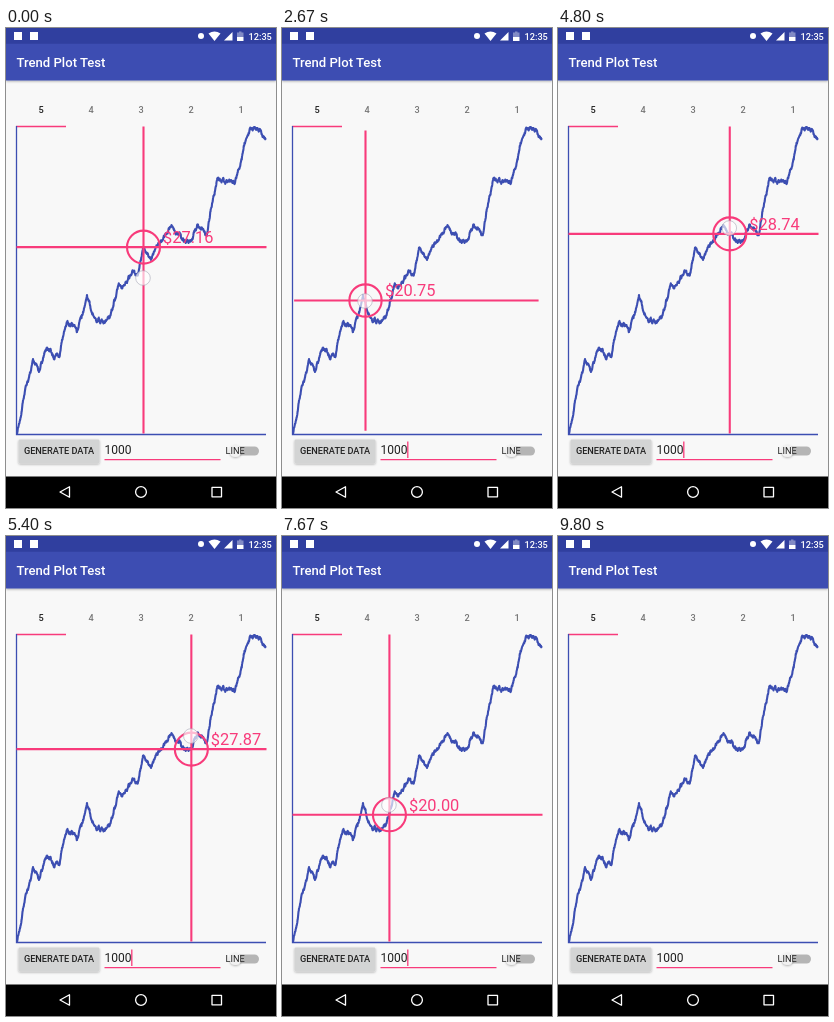
An HTML page for the animation above (9.99 s loop, 270x480 px).

```html
<!DOCTYPE html>
<html lang="en">
<head>
<meta charset="utf-8">
<title>Trend Plot Test</title>
<style>
  html, body { margin: 0; width: 100%; height: 100%; overflow: hidden; background: #f8f8f8; }
  svg { display: block; width: 100%; height: 100%; font-family: Roboto, sans-serif; }
  .bold { font-weight: 500; }
  .mid { text-anchor: middle; }
  .accent { stroke: #f83b7b; fill: none; }
  .blue { stroke: #3c4eb2; fill: none; }
</style>
</head>
<body>
<svg viewBox="0 0 270 480" font-size="9.2">
  <defs>
    <filter id="shade" x="-20%" y="-30%" width="140%" height="180%">
      <feDropShadow dx="0" dy="0.9" stdDeviation="0.9" flood-opacity="0.3"/>
    </filter>
  </defs>
  <rect width="270" height="480" fill="#f8f8f8"/>

  <rect y="15" width="270" height="37.5" fill="#3c4eb2" filter="url(#shade)"/>
  <rect width="270" height="15.75" fill="#303f9f"/>
  <text class="bold" x="10.5" y="39" font-size="13.1" fill="#fff">Trend Plot Test</text>
  <g fill="#fff">
    <rect x="8" y="4" width="8" height="8"/>
    <rect x="24" y="4" width="8" height="8"/>
    <circle cx="195" cy="8" r="3"/>
    <path d="M202.5 5.5Q208.5 1.5 214.5 5.5L208.5 13Z"/>
    <path d="M218 12.5L226.5 4V12.5Z"/>
    <path d="M231 4.5H233V3.500H235.5V4.5H237.5V9H231Z" opacity=".4"/>
    <path d="M231 9H237.5V13H231Z"/>
    <text class="bold" x="242.5" y="11.8">12:35</text>
  </g>

  <g id="tabs" class="bold mid"></g>
  <path class="accent" d="M10 98.5H60" stroke-width="1.4"/>
  <path class="blue" d="M10.5 98V406.5H260" stroke-width="1.3"/>
  <path id="chart" class="blue" stroke-width="2.1" stroke-linejoin="round"/>

  <rect x="12.5" y="411.5" width="81" height="24" rx="1.4" fill="#d3d4d4" filter="url(#shade)"/>
  <text class="bold mid" x="53" y="426.3" fill="#212121">GENERATE DATA</text>
  <text x="98.5" y="426.3" font-size="12" fill="#212121">1000</text>
  <path class="accent" d="M98.5 431.7H214.5" stroke-width="1.3"/>
  <path id="caret" class="accent" d="M125.8 413.5V430" stroke-width="1.3"/>
  <rect x="227" y="418.5" width="26" height="9" rx="4.5" fill="#b5b5b5"/>
  <circle cx="229.5" cy="423" r="6" fill="#f1f1f1" filter="url(#shade)"/>
  <text x="219.5" y="426.3" fill="#212121">LINE</text>

  <g id="scrub" transform="translate(.5 -.4)">
    <path id="cross" class="accent" stroke-width="2.1"/>
    <circle id="ring" class="accent" stroke-width="2.1"/>
    <text id="price" font-size="16.4" fill="#f83b7b"></text>
  </g>
  <circle id="touch" r="7.3" fill="#fff" fill-opacity=".65" stroke="#a9a9b8" stroke-opacity=".6"/>

  <rect y="448.5" width="270" height="31.5" fill="#000"/>
  <g fill="none" stroke="#fff" stroke-width="1.3" stroke-linejoin="round">
    <path d="M54 464L63.5 458.8V469.2Z"/>
    <circle cx="135" cy="464" r="5.4"/>
    <rect x="206" y="459.3" width="9.5" height="9.5"/>
  </g>
</svg>
<script>
const LOOP = 9990, GROW = 200, HOLD = 320;
const LEFT = 10, RIGHT = 260, TOP = 99, BOTTOM = 406;
const FIRST = 11, PER_PX = 4;

// Main turns of the price line; the wiggle between them is random
const turns = [
  [11, 406], [27, 331], [33, 344], [42, 321], [53, 329], [61, 294], [71, 304],
  [77, 283.9], [81, 267], [83, 272.9], [88, 289], [104, 288], [107, 279.2],
  [113, 256], [117, 258.25], [132, 246], [137, 219.5], [145, 232], [163, 200],
  [185, 213], [191, 198], [201, 206], [211, 152], [229, 155], [240, 111],
  [251, 100], [260, 110]
];

// A press holds at x, then swings out and back while the finger keeps its height
const presses = [
  { down: -200, up: 2108, x: 137, swing: -20.4, fingerY: 250 },
  { down: 2490, up: 3120, x: 83, swing: 9, fingerY: 273 },
  { down: 3490, up: 4060, x: 77, swing: 13, fingerY: 273 },
  { down: 4430, up: 5590, x: 170, swing: 35.2, fingerY: 200 },
  { down: 6030, up: 6650, x: 165, swing: -15, fingerY: 205 },
  { down: 7030, up: 8190, x: 135, swing: -32.3, fingerY: 269 },
  { down: 8630, up: 9390, x: 150, swing: 20, fingerY: 210 }
];

const $ = id => document.getElementById(id);
const set = (id, attrs) => {
  for (const k in attrs) $(id).setAttribute(k, attrs[k]);
};
const show = (id, on) => set(id, { visibility: on ? "visible" : "hidden" });
const mix = (a, b, p) => a + (b - a) * p;
const clamp = (v, lo, hi) => Math.min(hi, Math.max(lo, v));
const wave = p => (1 - Math.cos(Math.PI * p)) / 2;
const ease = p => wave(clamp(p, 0, 1));

let seed = 7;
const random = () => (seed = seed * 16807 % 2147483647) / 2147483647;

const heights = [];
const indexAt = x => Math.round((x - FIRST) * PER_PX);
const heightAt = x => heights[indexAt(x)];

// Midpoint displacement between two known heights
function roughen(a, b) {
  if (b - a < 2) return;
  const m = (a + b) >> 1;
  const y = mix(heights[a], heights[b], (m - a) / (b - a));
  heights[m] = clamp(y + (random() - 0.5) * 1.5 * Math.sqrt(b - a), TOP, BOTTOM);
  roughen(a, m);
  roughen(m, b);
}

function buildChart() {
  for (const [x, y] of turns) heights[indexAt(x)] = y;
  for (let i = 1; i < turns.length; i++) roughen(indexAt(turns[i - 1][0]), indexAt(turns[i][0]));
  set("chart", { d: "M" + heights.map((y, i) => `${FIRST + i / PER_PX} ${y}`).join("L") });
}

function buildTabs() {
  for (let i = 0; i < 5; i++) {
    $("tabs").innerHTML +=
      `<text x="${35 + 50 * i}" y="84.6" fill="${i ? "#757575" : "#212121"}">${5 - i}</text>`;
  }
}

function draw(t) {
  show("caret", t >= 330 && (t - 330) % 996 < 498);

  const press = presses.find(p => t >= p.down && t < p.up + GROW);
  show("scrub", press);
  show("touch", press && t < press.up);
  if (!press) return;

  const { down, up, swing, fingerY } = press;
  const size = ease((t - down) / GROW) * (1 - ease((t - up) / GROW));
  const drag = clamp((t - down - HOLD) / (up - down - HOLD), 0, 1);
  const x = press.x + swing * wave(2 * drag);
  const y = heightAt(x);
  set("cross", {
    d: `M${mix(x, LEFT, size)} ${y}H${mix(x, RIGHT, size)}` +
       `M${x} ${mix(y, TOP, size)}V${mix(y, BOTTOM, size)}`
  });
  set("ring", { cx: x, cy: y, r: 16.5 * size });
  set("price", { x: x + 19.5, y: y - 4 });
  $("price").textContent = "$" + (27.94 - 0.12 * (y - 213)).toFixed(2);
  set("touch", { cx: x, cy: fingerY });
}

buildChart();
buildTabs();
const start = performance.now();
function tick() {
  draw((performance.now() - start) % LOOP);
  requestAnimationFrame(tick);
}
tick();
</script>
</body>
</html>
```
